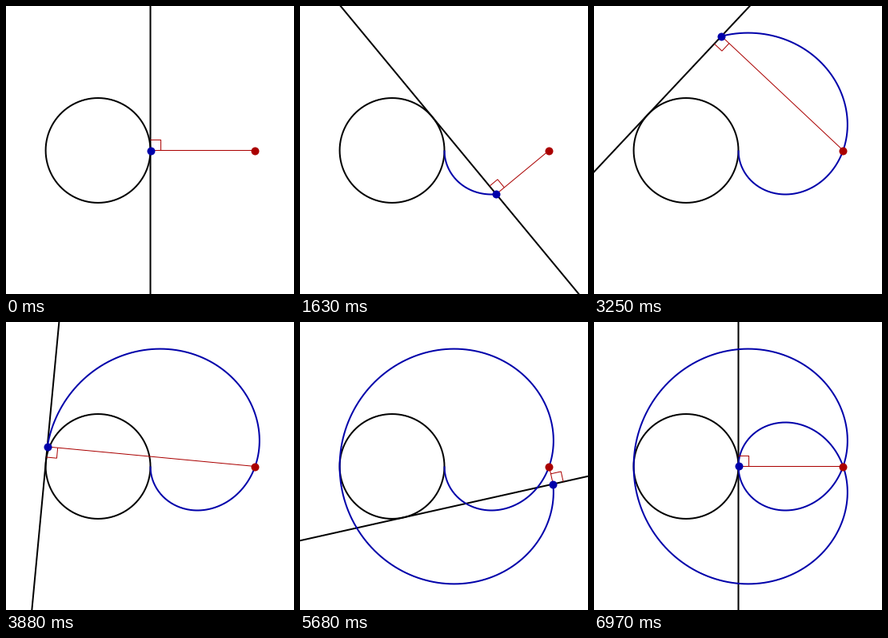
Write a matplotlib script that moves like this. It is 360x360 px and loops after 7.97 s.

```python
import numpy as np
import matplotlib.pyplot as plt
from matplotlib.animation import FuncAnimation

# Pedal curve of a unit circle with respect to an outside point
SIZE = 360
UNIT = SIZE / 5.5
ORIGIN = np.array([180.5 - UNIT, 180.5])
PEDAL = np.array([3.0, 0.0])
MARK = 0.2
STEPS = 200
SUB = 3
BLACK, RED, BLUE = "#000000", "#aa0000", "#0000aa"

TICK = 10          # ms per drawn frame
HOLD = 1000        # ms of rest before the sweep
STEP = 30          # ms per sweep step
LOOP = 7970


def to_px(p):
    return ORIGIN + UNIT * np.asarray(p) * [1, -1]


def axes_at(a):
    """Unit normal and tangent of the circle at angle a."""
    n = np.stack([np.cos(a), np.sin(a)], axis=-1)
    t = np.stack([-np.sin(a), np.cos(a)], axis=-1)
    return n, t


def foot_at(a):
    n, t = axes_at(a)
    return n + (t @ PEDAL)[..., None] * t


fig = plt.figure(figsize=(SIZE / 72, SIZE / 72), dpi=72, facecolor="white")
ax = fig.add_axes([0, 0, 1, 1])
ax.set_xlim(0, SIZE)
ax.set_ylim(SIZE, 0)
ax.axis("off")


def stroke(color, width, z, pts=((0, 0),)):
    x, y = to_px(pts).T
    return ax.plot(x, y, color=color, lw=width, zorder=z, snap=False,
                   solid_joinstyle="miter", solid_capstyle="butt")[0]


def dot(color, z, p=(0, 0)):
    x, y = to_px(p)
    return ax.plot([x], [y], "o", color=color, ms=10, mew=0, zorder=z,
                   snap=False)[0]


def place(line, pts):
    line.set_data(*to_px(pts).T)


angles = np.linspace(0, 2 * np.pi, STEPS * SUB + 1)
curve = foot_at(angles)

stroke(BLACK, 2, 1, axes_at(angles)[0])
tangent = stroke(BLACK, 2, 2)
trace = stroke(BLUE, 2, 3)
square = stroke(RED, 1, 4)
normal = stroke(RED, 1, 4)
dot(RED, 5, PEDAL)
foot_dot = dot(BLUE, 6)


def step_at(ms):
    if ms < HOLD:
        return 0
    return min(STEPS, (ms - HOLD) // STEP + 1)


def update(i):
    k = step_at(i * TICK)
    n, t = axes_at(angles[k * SUB])
    foot = curve[k * SUB]
    side = np.sign(n @ PEDAL - 1) * n
    place(tangent, [foot - 12 * t, foot + 12 * t])
    place(trace, curve[:k * SUB + 1])
    place(square, [foot + MARK * t, foot + MARK * (t + side),
                   foot + MARK * side])
    place(normal, [foot, PEDAL])
    place(foot_dot, [foot])
    return tangent, trace, square, normal, foot_dot


anim = FuncAnimation(fig, update, frames=LOOP // TICK, interval=TICK,
                     repeat=True, repeat_delay=0)
plt.show()
```
